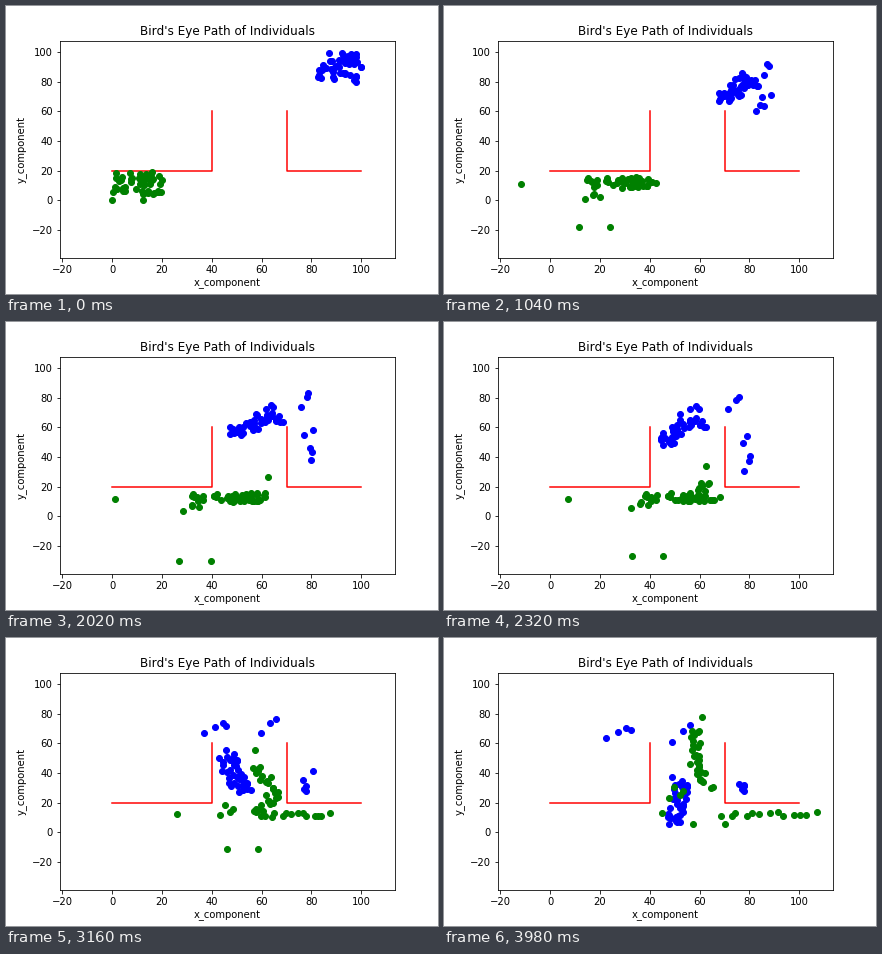
Animation, 432 px wide and 288 px high, one loop 4 s. Source, as a matplotlib script:

```python
import numpy as np
import matplotlib.pyplot as plt
from matplotlib.animation import FuncAnimation

FRAMES, INTERVAL = 200, 20
rng = np.random.default_rng(12)
plt.rcParams["text.kerning_factor"] = 6


def swarm(n, path, start, speed, accel=(0, 0), spread=(0, 0), extra=(0, 0)):
    """Walkers strung along a path; ranges run from the last to the first one.

    Each walks start + speed*t + accel*t^2 along the path and stops at its end.
    The sideways spread begins wider by `extra`, which soon fades.
    """
    path = np.array(path, float)
    legs = np.hypot(*np.diff(path, axis=0).T)
    marks = np.concatenate([[0], np.cumsum(legs)])
    rank = (np.arange(n) + rng.uniform(0.1, 0.9, n)) / n
    side = rng.uniform(-1, 1, (n, 2))
    s0, v, a = (lo + (hi - lo) * rank for lo, hi in (start, speed, accel))

    def at(t):
        s = s0 + v * t + a * t * t
        xy = np.column_stack([np.interp(s, marks, axis) for axis in path.T])
        return xy + side * (np.array(spread) + np.array(extra) * np.exp(-t / 30))

    return at


green = [
    # through the gap and upwards
    swarm(30, [(0, 11), (60, 13), (65, 28), (57.5, 44), (59, 68)],
          (2, 19), (0.2, 0.36), (0.0009, 0.0007), (2.4, 3), (0, 5)),
    # straight on to the right
    swarm(13, [(0, 11), (110, 13)],
          (12, 20), (0.42, 0.38), (-0.0007, 0.0003), (0.5, 1.5), (0, 5)),
    # slow ones at the back
    swarm(4, [(3, 9), (10, 4), (25, 5), (45, 13), (52, 31)],
          (-2, 2), (0.3, 0.32), spread=(3, 4)),
    # the leader
    swarm(1, [(19.5, 5.5), (31, 4), (51, 17), (64, 28), (57, 57), (61, 79)],
          (0, 0), (0.48, 0.48), (0.0002, 0.0002)),
    # turns back first
    swarm(1, [(1, 9), (-13.5, 11), (45, 13)],
          (0, 0), (0.2, 0.2), (0.0009, 0.0009)),
]
# two that swing far below
for x in (0, 12.5):
    green.append(swarm(
        1, [(x, 0), (x + 6, -6), (x + 16, -27.5), (x + 28, -30),
            (x + 38.5, -22.5), (x + 58, 6.5)],
        (0, 0), (0.4, 0.4), (0.0003, 0.0003)))

blue = [
    # through the gap and downwards
    swarm(38, [(100, 100), (68, 68), (48, 57), (46, 46), (53, 28), (49, 6)],
          (7, 21), (0.38, 0.45), (0.0002, 0.0003), (3.2, 4), (2.5, 2.5)),
    # caught in the right corner
    swarm(5, [(97, 82), (88, 70), (78, 54), (80, 38), (77, 30)],
          (0, 0), (0.27, 0.5), spread=(1.5, 2.5)),
    # over the left wall
    swarm(4, [(89, 94), (62, 72), (42, 71), (22, 66)],
          (-2, 2), (0.33, 0.37), spread=(1, 3), extra=(4, 1)),
    # latecomers
    swarm(3, [(97, 97), (77, 75), (60, 68), (46, 60)],
          (0, 0), (0.24, 0.33), spread=(1.5, 6), extra=(0, -4)),
]

fig = plt.figure(figsize=(6, 4), dpi=72)
ax = fig.add_axes([0.125, 0.125, 0.775, 0.755])
ax.set(xlim=(-20.86, 113.42), ylim=(-38.8, 107.7),
       xlabel="x_component", ylabel="y_component",
       title="Bird's Eye Path of Individuals")
ax.plot([0, 40, 40], [20, 20, 60], "r")
ax.plot([100, 70, 70], [20, 20, 60], "r")
blue_dots, = ax.plot([], [], "bo")
green_dots, = ax.plot([], [], "go")


def update(t):
    for dots, crowd in ((blue_dots, blue), (green_dots, green)):
        dots.set_data(*np.concatenate([at(t) for at in crowd]).T)
    return blue_dots, green_dots


anim = FuncAnimation(fig, update, frames=FRAMES, interval=INTERVAL,
                     repeat=True, repeat_delay=0)
plt.show()
```
